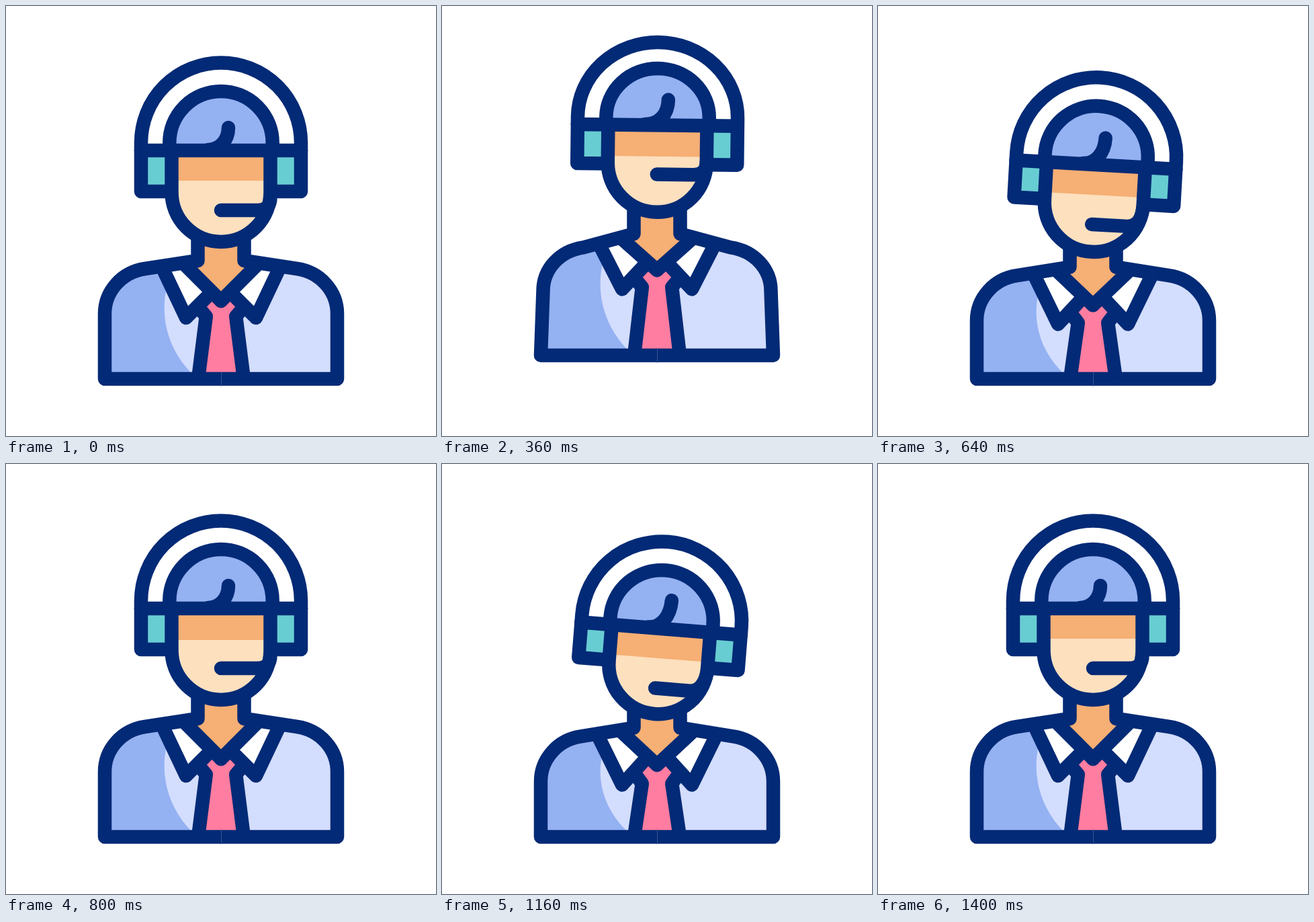
An HTML page with a canvas for the animation above (1480 ms loop, 640 px wide and 640 px high).

```html
<!DOCTYPE html>
<html lang="en">
<head>
<meta charset="utf-8">
<title>Support agent</title>
<style>
  html, body { margin: 0; width: 100%; height: 100%; overflow: hidden; background: #fff; }
  canvas { display: block; width: 640px; height: 640px; }
</style>
</head>
<body>
<canvas width="640" height="640"></canvas>
<script>
const ctx = document.querySelector('canvas').getContext('2d');
const LOOP = 1480;
const INK = '#032a76', SKIN = '#fde0be', SKIN_SHADE = '#f6af74', BLUE = '#94b1f2',
      PALE = '#d3ddfd', PINK = '#fe7da0', TEAL = '#68cdd2';

const ease = (t, from, to) => {
  const p = Math.min(1, Math.max(0, (t - from) / (to - from)));
  return p * p * (3 - 2 * p);
};
const fill = (path, color) => { ctx.fillStyle = color; ctx.fill(new Path2D(path)); };
const line = path => ctx.stroke(new Path2D(path));

function mirrored(draw) {
  draw();
  ctx.save();
  ctx.translate(640, 0);
  ctx.scale(-1, 1);
  draw();
  ctx.restore();
}

// Each moving coordinate is a rest value plus its shift in the raised and the nodding pose.
function drawBody(at) {
  const sideX = at(147, 4, 0), sideY = at(458, -1, 16);
  const shoulderX = at(207, 4, 0), shoulderY = at(391, 1.5, 16);
  const neckY = at(379, -8, 15);
  const shoulder = `L${shoulderX} ${shoulderY}
    C${shoulderX - 35} ${shoulderY + 5} ${sideX} ${sideY - 33} ${sideX} ${sideY} L147 555`;
  // The collar starts on the slope between neck and shoulder.
  const collarX = at(232, 2, -1);
  const collarY = neckY + (shoulderY - neckY) * (285 - collarX) / (285 - shoulderX) + 1;
  const collarTop = `${collarX} ${collarY}`;
  const collarTip = `268 ${at(464, -11, 15)}`;
  const collarInner = `304 ${at(428, -13, 11)}`;
  const vTop = `268 ${at(387, -8, 14)}`;
  const vTip = `320 ${at(439, -14, 10)}`;
  const knot = `286 ${at(448, -12, 13)} L297.8 ${at(462, -12, 15)} L286.3 553`;

  mirrored(() => fill(`M321 ${neckY} H285 ${shoulder} H321 Z`, PALE));
  fill(`M243 ${at(405, -3, 13)} L243 ${at(385, -4, 15)} ${shoulder} H285
    C238 ${at(514, -1, 3)} 226 ${at(455, -2, 9)} 243 ${at(405, -3, 13)} Z`, BLUE);
  mirrored(() => {
    fill(`M320.5 ${at(430, -14, 10)} L${knot} H320.5 Z`, PINK);
    fill(`M${collarTop} L${vTop} L${collarInner} L${collarTip} Z`, '#fff');
    fill(`M320.5 330 H285 V${neckY} L${vTop} L${vTip} H320.5 Z`, SKIN_SHADE);
  });
  mirrored(() => {
    line(`M285.5 335 V${neckY} ${shoulder} H320`);
    line(`M${collarTop} L${collarTip} L${collarInner}`);
    line(`M${vTop} L${vTip}`);
    line(`M${knot}`);
  });
  ctx.fillStyle = 'rgba(255,255,255,.2)';
  ctx.fillRect(320, 545, 1, 20);
}

function drawHead(at, shadeLag) {
  const bandY = at(215, -8, 33), springY = bandY - 11.5;
  const cupY = at(276, -10, 23.8);
  const jawY = at(277, -14, 23.5);
  const micY = at(304, -26, 33), micX = at(320, 0, -2);
  const tipX = at(331, 5, 1.5), tipY = at(181, -11, 23);
  const shadeY = at(260, -6, 32) + shadeLag;
  const jaw = `M246.5 ${bandY} V${jawY} A73.5 74 0 0 0 393.5 ${jawY} V${bandY}`;
  const dome = (radius, topY) =>
    `M${320 - radius} ${bandY} V${springY} A${radius} ${springY - topY} 0 0 1 ${320 + radius} ${springY} V${bandY}`;
  const hair = dome(76.7, at(127, -4, 34));

  fill(hair, BLUE);
  fill(jaw, SKIN);
  fill(`M246 ${bandY} H394 V${shadeY} H246 Z`, SKIN_SHADE);
  mirrored(() => {
    const cup = `M201 ${bandY} V${cupY} H246`;
    fill(`${cup} V${bandY} Z`, TEAL);
    line(cup);
  });
  line(dome(119, at(84.5, 0, 34)));
  line(hair);
  line(jaw);
  line(`M201 ${bandY} H439`);
  line(`M301 ${bandY - 1} C${tipX - 13} ${bandY - 1} ${tipX} ${tipY + (bandY - tipY) * .55} ${tipX} ${tipY}`);
  line(`M${micX} ${micY} H${at(374, 0, -5)}
    Q${at(394, 0, -6)} ${micY} 393.5 ${at(284, -24, 23)}`);
}

function draw(t) {
  const raise = ease(t, 140, 311) - ease(t, 311, 535);
  const nod = ease(t, 311, 535) - ease(t, 535, 795) + ease(t, 1020, 1195) - ease(t, 1195, 1395);
  const at = (rest, up, down) => rest + up * raise + down * nod;
  const shadeLag = t >= 535 && t < 1195 ? 2 * (1 - nod) : 0;
  const pivotY = at(300, -14, 23);

  ctx.fillStyle = '#fff';
  ctx.fillRect(0, 0, 640, 640);
  ctx.strokeStyle = INK;
  ctx.lineWidth = 20.5;
  ctx.lineCap = ctx.lineJoin = 'round';

  ctx.save();
  ctx.translate(0, -40 * raise);
  drawBody(at);
  ctx.translate(320, pivotY);
  ctx.rotate(nod * 5.1 * Math.PI / 180);
  ctx.translate(-320, -pivotY);
  drawHead(at, shadeLag);
  ctx.restore();
}

const start = performance.now();
function frame() {
  draw((performance.now() - start) % LOOP);
  requestAnimationFrame(frame);
}
frame();
</script>
</body>
</html>
```
